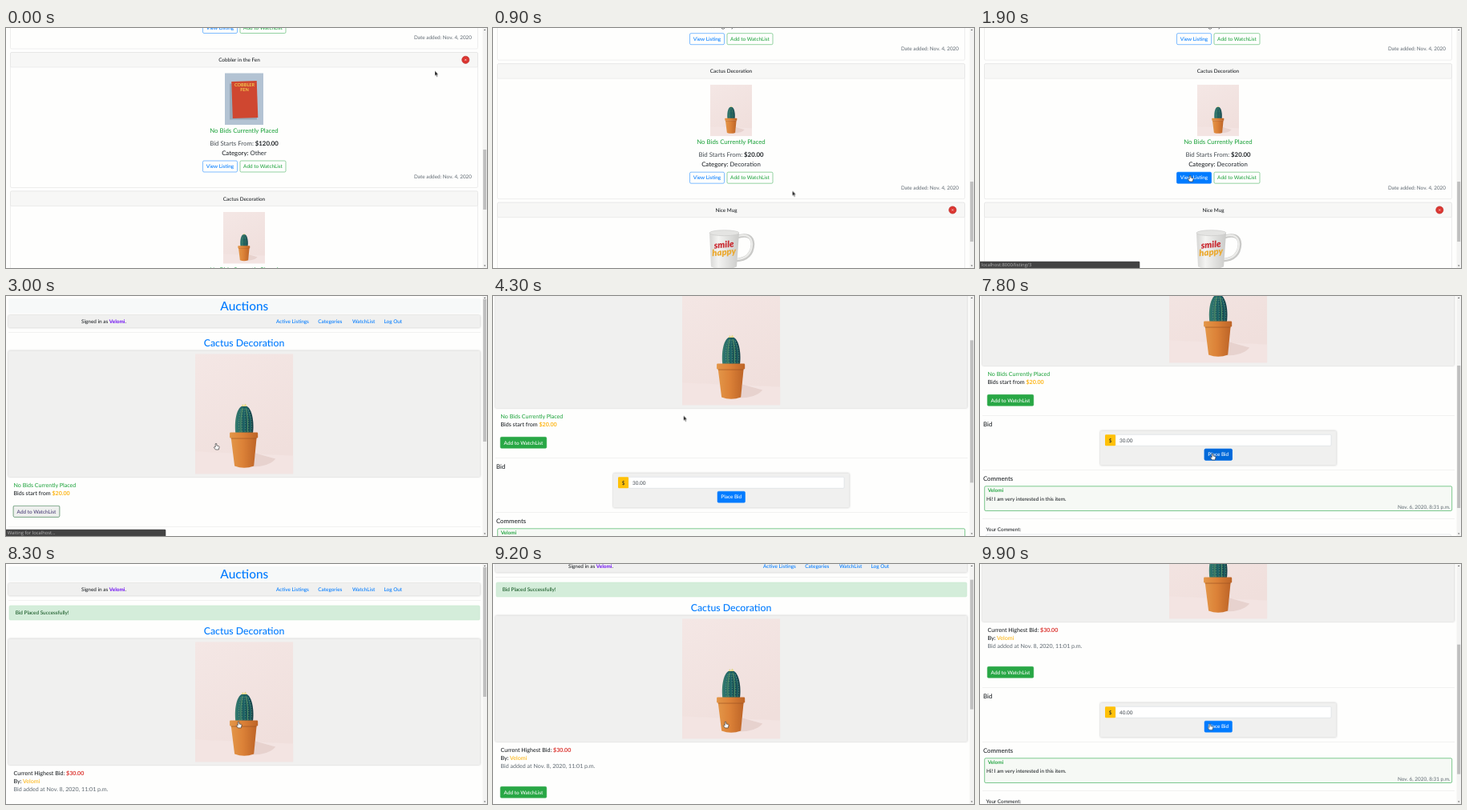
An HTML page that plays this animation: 600x300 px, repeating every 10000 ms.

```html
<!DOCTYPE html>
<html lang="en">
<head>
<meta charset="utf-8">
<title>Auctions</title>
<style>
@property --s { syntax: "<number>"; inherits: true; initial-value: 0; }
html, body { margin: 0; width: 100%; height: 100%; overflow: hidden; background: #fefefd; }
svg { display: block; }
#stage { width: 100vw; height: 100vh; }
text { font-family: Lato, "Open Sans", sans-serif; font-weight: 500; text-rendering: geometricPrecision; }
.soft { filter: drop-shadow(0 .7px 1px rgba(0, 0, 0, .25)); }

/* one percent of the loop is 100 ms */
.page, .on, #cursor { animation: 10s step-end -20ms infinite; }
.scroll { transform: translateY(calc(var(--s) * -1px)); }
.thumb { transform: translateY(calc(var(--s) * var(--k) * 1px)); }

#list { --k: .2516; animation-name: listShow, listScroll; }
#item { --k: .597; animation-name: itemShow, itemScroll; }
#done { --k: .54; animation-name: doneShow, doneScroll; }
@keyframes listShow { 0% { opacity: 1 } 30%, 100% { opacity: 0 } }
@keyframes itemShow { 0% { opacity: 0 } 30% { opacity: 1 } 83%, 100% { opacity: 0 } }
@keyframes doneShow { 0% { opacity: 0 } 83%, 100% { opacity: 1 } }
@keyframes listScroll {
  0% { --s: 0; animation-timing-function: steps(3) }
  3% { --s: 64; animation-timing-function: steps(3) }
  6% { --s: 120; animation-timing-function: steps(3) }
  9%, 100% { --s: 159.3 }
}
@keyframes itemScroll {
  0%, 38% { --s: 0 }
  38% { animation-timing-function: steps(5) }
  43% { --s: 86; animation-timing-function: steps(6) }
  49%, 100% { --s: 139 }
}
@keyframes doneScroll {
  0% { --s: 0 } 91% { --s: 9 } 92% { --s: 29 } 93% { --s: 85 } 94% { --s: 145 } 95%, 100% { --s: 179 }
}

#viewHover { animation-name: from14 }
#viewRing { animation-name: from25 }
#plainBtn { animation-name: plain }
#bidHover { animation-name: from65 }
#bidRing { animation-name: from79 }
#status { animation-name: status }
#url { animation-name: url }
#wait { animation-name: from25 }
@keyframes from14 { 0% { opacity: 0 } 14%, 100% { opacity: 1 } }
@keyframes from25 { 0% { opacity: 0 } 25%, 100% { opacity: 1 } }
@keyframes from65 { 0% { opacity: 0 } 65%, 100% { opacity: 1 } }
@keyframes from79 { 0% { opacity: 0 } 79%, 100% { opacity: 1 } }
@keyframes plain { 0% { opacity: 1 } 31%, 100% { opacity: 0 } }
@keyframes status { 0% { opacity: 0 } 14% { opacity: 1 } 33%, 100% { opacity: 0 } }
@keyframes url { 0% { opacity: 1 } 25%, 100% { opacity: 0 } }

#cursor { animation-name: move }
#arrow { animation-name: arrow }
#hand { animation-name: hand }
@keyframes arrow { 0% { opacity: 1 } 14% { opacity: 0 } 34% { opacity: 1 } 65%, 100% { opacity: 0 } }
@keyframes hand { 0% { opacity: 0 } 14% { opacity: 1 } 34% { opacity: 0 } 65%, 100% { opacity: 1 } }
@keyframes move {
  0% { transform: translate(535px, 53.5px); animation-timing-function: steps(9) }
  9% { transform: translate(373.5px, 203.5px); animation-timing-function: steps(2) }
  11% { transform: translate(291px, 191px); animation-timing-function: steps(5) }
  16% { transform: translate(264px, 187px); animation-timing-function: steps(3) }
  19%, 32% { transform: translate(262px, 184px) }
  32% { animation-timing-function: steps(3) }
  35% { transform: translate(303px, 124px); animation-timing-function: steps(2) }
  37%, 38% { transform: translate(272px, 138px) }
  38% { animation-timing-function: steps(5) }
  43%, 54% { transform: translate(237.7px, 149.5px) }
  54% { animation-timing-function: steps(4) }
  58% { transform: translate(105px, 102px); animation-timing-function: steps(4) }
  62% { transform: translate(427px, 172px); animation-timing-function: steps(3) }
  65% { transform: translate(292px, 197px) }
  66% { transform: translate(290px, 196.8px) }
  99%, 100% { transform: translate(286.7px, 199.5px) }
}
</style>
</head>
<body>
<svg id="stage" viewBox="0 0 600 300" xmlns="http://www.w3.org/2000/svg"></svg>
<script>
const BLUE = '#007bff', GREEN = '#28a745', AMBER = '#ffc107', GRAY = '#6c757d', INK = '#212529';
const USER = 'Velomi';

const rect = (x, y, w, h, fill, more = '') =>
  `<rect x="${x}" y="${y}" width="${w}" height="${h}" fill="${fill}" ${more}/>`;
const text = (x, y, s, size = 6.4, fill = INK, more = '') =>
  `<text x="${x}" y="${y}" font-size="${size}" fill="${fill}" ${more}>${s}</text>`;
const mid = (x, y, s, size, fill, more = '') => text(x, y, s, size, fill, 'text-anchor="middle" ' + more);
const end = (x, y, s) => text(x, y, s, 6.4, GRAY, 'text-anchor="end"');
const span = (s, fill = INK, weight = 700) => `<tspan fill="${fill}" font-weight="${weight}">${s}</tspan>`;
const edge = (c, w = .5) => `stroke="${c}" stroke-width="${w}"`;
const rule = y => rect(3, y, 589, .5, '#e3e3e3');
const button = (x, y, w, label, fill, ink, line = fill) =>
  rect(x, y, w, 14, fill, `rx="1.5" ${edge(line)}`) + mid(x + w / 2, y + 9.2, label, 6.4, ink);
const ring = (id, x, y, w, c) =>
  rect(x - .8, y - .8, w + 1.6, 15.6, 'none', `id="${id}" class="on" rx="2" ${edge(c, 1.3)} stroke-opacity=".45"`);
const cactus = (x, y, w, h) => `<use href="#cactus" x="${x}" y="${y}" width="${w}" height="${h}"/>`;

function bar(top, height) {
  return rect(594.5, 0, 5.5, 300, '#f3f3f2') +
    rect(595.2, top, 4, height, '#bfbfbf', 'class="thumb"') +
    '<path d="M596 3l1.2-1.5 1.2 1.5zM596 296.5l1.2 1.5 1.2-1.5z" fill="#555"/>';
}

function page(id, body, top, height) {
  return `<g id="${id}" class="page">${rect(0, 0, 600, 300, '#fefefd')}<g class="scroll">${body}</g>${bar(top, height)}</g>`;
}

function defs() {
  const ribs = [53.5, 57, 61, 65, 68.5].map((x, i) =>
    `<path d="M${x} 98Q${x + (i - 2) * 1.2} 80 ${61 + (x - 61) * .45} 67" fill="none" ${edge(i % 2 ? '#4b8d68' : '#257170', 1.2)}/>
     <path d="M${x + 1.4} 97Q${x + 1.4 + (i - 2)} 80 ${61.5 + (x - 61) * .5} 68" fill="none" ${edge('#d5cf93', .7)} stroke-dasharray=".7 2.3"/>`).join('');
  return `<defs>
    <linearGradient id="wall" x2=".4" y2="1"><stop stop-color="#f4e7e5"/><stop offset="1" stop-color="#f0dfdc"/></linearGradient>
    <linearGradient id="clay"><stop stop-color="#e39648"/><stop offset=".45" stop-color="#dc8238"/><stop offset="1" stop-color="#bd6427"/></linearGradient>
    <linearGradient id="skin"><stop stop-color="#3c7f70"/><stop offset=".5" stop-color="#17575c"/><stop offset="1" stop-color="#123f47"/></linearGradient>
    <linearGradient id="china"><stop stop-color="#d6d6d4"/><stop offset=".3" stop-color="#f4f4f2"/><stop offset="1" stop-color="#cbcbc9"/></linearGradient>
    <symbol id="cactus" viewBox="0 0 122 150" preserveAspectRatio="none">
      ${rect(0, 0, 122, 150, 'url(#wall)')}
      <path d="M0 122L122 127V150H0z" fill="#f3e4e2"/>
      <path d="M70 141L75 124L100 131Q92 141 70 141z" fill="#dfc6c2" opacity=".6"/>
      <path d="M50.500 101C48 86 51 64.500 61 64.500C71 64.500 74 86 71.500 101z" fill="url(#skin)"/>${ribs}
      <path d="M57.500 65.500l1.500-3 1.500 2 2-2.500 2 3.500z" fill="#e6d98c"/>
      <path d="M44.500 104H76.500L73 140Q61 144.500 49 140z" fill="url(#clay)"/>
      ${rect(43, 98, 35, 7, 'url(#clay)', 'rx="1.2"')}
      ${rect(44.6, 105, 31.6, 1.3, '#9c5222', 'opacity=".5"')}
    </symbol></defs>`;
}

function book(y) {
  return rect(273, y, 48, 64.5, '#b3c3d3') + rect(279, y + 13, 34, 45, '#8496a6', 'opacity=".6"') +
    rect(282, y + 10, 31.5, 46, '#cf4730', `transform="rotate(-2 297 ${y + 32})"`) +
    mid(297.5, y + 16.5, 'COBBLER', 5.6, '#f3c84d', 'style="font-weight:700"') +
    mid(297.5, y + 22.5, 'FEN', 5.6, '#f3c84d', 'style="font-weight:700"');
}

function mug(y) {
  const word = (x, dy, s, c) => text(x, y + dy, s, 11.3, c,
    `style="font-weight:900;font-style:italic" transform="rotate(-5 ${x} ${y + dy})"`);
  return `<path d="M304 ${y + 11}Q323 ${y + 5} 324 ${y + 20}Q323 ${y + 39} 303 ${y + 40}" fill="none" ${edge('#c9c9c7', 4.6)}/>
    <path d="M304 ${y + 10.5}Q322 ${y + 5} 323 ${y + 20}Q322 ${y + 38} 303 ${y + 39}" fill="none" ${edge('#ececea', 2.3)}/>
    <path d="M270 ${y + 6}L272 ${y + 48}Q288 ${y + 56} 304 ${y + 48}L307 ${y + 6}z" fill="url(#china)"/>
    <ellipse cx="288.500" cy="${y + 6}" rx="18.500" ry="3.500" fill="#e4e4e2" ${edge('#c6c6c4', .6)}/>` +
    word(276, 25.5, 'smile', '#c92b32') + word(273.5, 35, 'happy', '#eba92f');
}

function card(i, title, picture, price, kind, own) {
  const y = 30.5 + 173.5 * i;
  const close = `<circle cx="573.300" cy="${y + 9.3}" r="4.600" fill="#dc3530" ${edge('#b52b27', .6)}/>` +
    `<path d="M572.300 ${y + 8.3}l2 2m0-2l-2 2" ${edge('#fff', .6)}/>`;
  return rect(5.5, y, 583, 169, '#fefefd', `rx="1.5" ${edge('#dcdcdc')}`) +
    rect(5.5, y, 583, 18.5, '#f7f7f6', `rx="1.5" ${edge('#dcdcdc')}`) +
    mid(own ? 291 : 297, y + 11.5, title) + (own ? close : '') + picture(y + 26) +
    mid(297, y + 100.7, 'No Bids Currently Placed', 7.8, GREEN) +
    mid(297, y + 116.6, 'Bid Starts From: ' + span(price), 7.8, '#555b61') +
    mid(297, y + 128.6, span('Category:', INK, 500) + ' ' + kind, 7.8, '#343a40') +
    button(245.5, y + 135.5, 43, 'View Listing', '#fefefd', BLUE, BLUE) +
    button(292, y + 135.5, 57, 'Add to WatchList', '#fefefd', GREEN, GREEN) +
    end(581, y + 157.3, 'Date added: Nov. 4, 2020');
}

function listPage() {
  const pot = y => cactus(271, y, 52, 64.5);
  return page('list',
    card(-1, 'Desk Lamp', () => '', '$35.00', 'Home') +
    card(0, 'Cobbler in the Fen', book, '$120.00', 'Other', true) +
    card(1, 'Cactus Decoration', pot, '$20.00', 'Decoration') +
    card(2, 'Nice Mug', y => mug(y + 6), '$10.00', 'Kitchen', true) +
    `<g id="viewHover" class="on">${button(245.5, 339.5, 43, 'View Listing', BLUE, '#fff')}</g>` +
    ring('viewRing', 245.5, 339.5, 43, BLUE), 152, 75);
}

function header() {
  const links = [[337, 'Active Listings'], [389.3, 'Categories'], [432, 'WatchList'], [471.5, 'Log Out']];
  return rect(3, 3, 589, 18.5, '#f7f9f9', 'rx="1.5"') + mid(297.3, 18, 'Auctions', 15.4, BLUE) +
    rect(3, 24, 588.5, 15.5, '#f0f0ef', 'rx="1.5" class="soft"') +
    text(94, 34, 'Signed in as ' + span(USER, '#6f10f2') + '.') +
    links.map(([x, s]) => text(x, 34, s, 6.4, BLUE)).join('') + rule(45);
}

// Bid form and comments, shared by both states of the listing
function lower(dy, amount, extra) {
  return `<g transform="translate(0 ${dy})">` +
    button(9.2, 262.3, 57.6, 'Add to WatchList', GREEN, '#fff') + rule(288.3) +
    text(4, 301.7, 'Bid', 7.8) +
    rect(150, 307.5, 294.5, 43, '#f0f0ef', 'rx="1.5" class="soft"') +
    rect(169, 312.3, 269, 14, '#fff', `rx="1.2" ${edge('#ced4da')}`) +
    rect(156, 312.3, 13, 14, AMBER, 'rx="1.2"') + mid(162.5, 321.6, '$') +
    text(174, 321.6, amount, 6.4, '#495057') +
    button(280, 330.2, 34.5, 'Place Bid', BLUE, '#fff') + rule(356.3) +
    text(4, 369.7, 'Comments', 7.8) +
    rect(5.7, 376.8, 583, 30.7, '#f6f9f5', `rx="1.5" ${edge(GREEN, .6)}`) +
    text(9.7, 383.5, span(USER, GREEN)) +
    text(8, 394.5, 'Hi! I am very interested in this item.') +
    end(586.5, 405.4, 'Nov. 6, 2020, 8:31 p.m.') + rule(417.5) +
    text(7.5, 432.8, 'Your Comment:') +
    rect(7.5, 437, 580, 40, '#fff', `rx="1.5" ${edge('#ced4da')}`) + extra + '</g>';
}

function hero(dy) {
  return mid(297, 63.2 + dy, 'Cactus Decoration', 12.3, BLUE) +
    rect(3, 68.5 + dy, 588.5, 157.5, '#f0f0ef', 'rx="1.5" class="soft"') +
    cactus(236, 72.3 + dy, 122.3, 150.2);
}

function itemPage() {
  const extra = `<g id="plainBtn" class="on">${button(9.2, 262.3, 57.6, 'Add to WatchList', '#eef0ee', '#4b3f78', '#5d7566')}</g>` +
    `<g id="bidHover" class="on">${button(280, 330.2, 34.5, 'Place Bid', '#0069d9', '#fff')}</g>` +
    ring('bidRing', 280, 330.2, 34.5, BLUE);
  return page('item', header() + hero(0) +
    text(9.5, 239.3, 'No Bids Currently Placed', 7.1, GREEN) +
    text(9.5, 249.4, 'Bids start from ' + span('$20.00', '#fdb515'), 7.1) +
    lower(0, '30.00', extra), 4, 178);
}

function donePage() {
  return page('done', header() +
    rect(4, 52, 587, 18, '#d4edda', `rx="1.5" ${edge('#c3e6cb')}`) +
    text(11.7, 63.2, 'Bid Placed Successfully!', 6.4, '#155724') + hero(25) +
    text(9.5, 264, 'Current Highest Bid: ' + span('$30.00', '#dc3530'), 7.1) +
    text(9.5, 274.2, span('By:', INK, 500) + ' ' + span(USER, '#fdb515', 500), 7.1) +
    text(9.5, 284.4, 'Bid added at Nov. 8, 2020, 11:01 p.m.', 7.1, GRAY) +
    lower(45, '40.00', ''), 4, 162);
}

function overlay() {
  const font = 'style="font-family:\'Open Sans\',sans-serif;font-weight:400"';
  return `<g id="status" class="on"><path d="M0 291.700H198q1.300 0 1.300 1.300V300H0z" fill="#434343"/>
    <g id="url" class="on">${text(1.7, 298, 'localhost:8000/listing/3', 5.8, '#b5b5b5', font)}</g>
    <g id="wait" class="on">${text(1.7, 298, 'Waiting for localhost...', 5.8, '#b5b5b5', font)}</g></g>
  <g id="cursor">
    <path id="arrow" class="on" d="M0 0V6.300L1.400 5.100L2.400 7.400L3.400 7L2.400 4.700H4.300z" fill="#111" ${edge('#fff', .4)}/>
    <path id="hand" class="on" d="M-.8 .7Q0-.4 .8 .7V3L3.600 3.700Q4.200 4 4 5L3.300 8H-.6L-2.700 5.200Q-2.500 4-.8 5z" fill="#fff" ${edge('#222', .6)}/>
  </g>`;
}

document.getElementById('stage').innerHTML = defs() + listPage() + itemPage() + donePage() + overlay();
</script>
</body>
</html>
```
